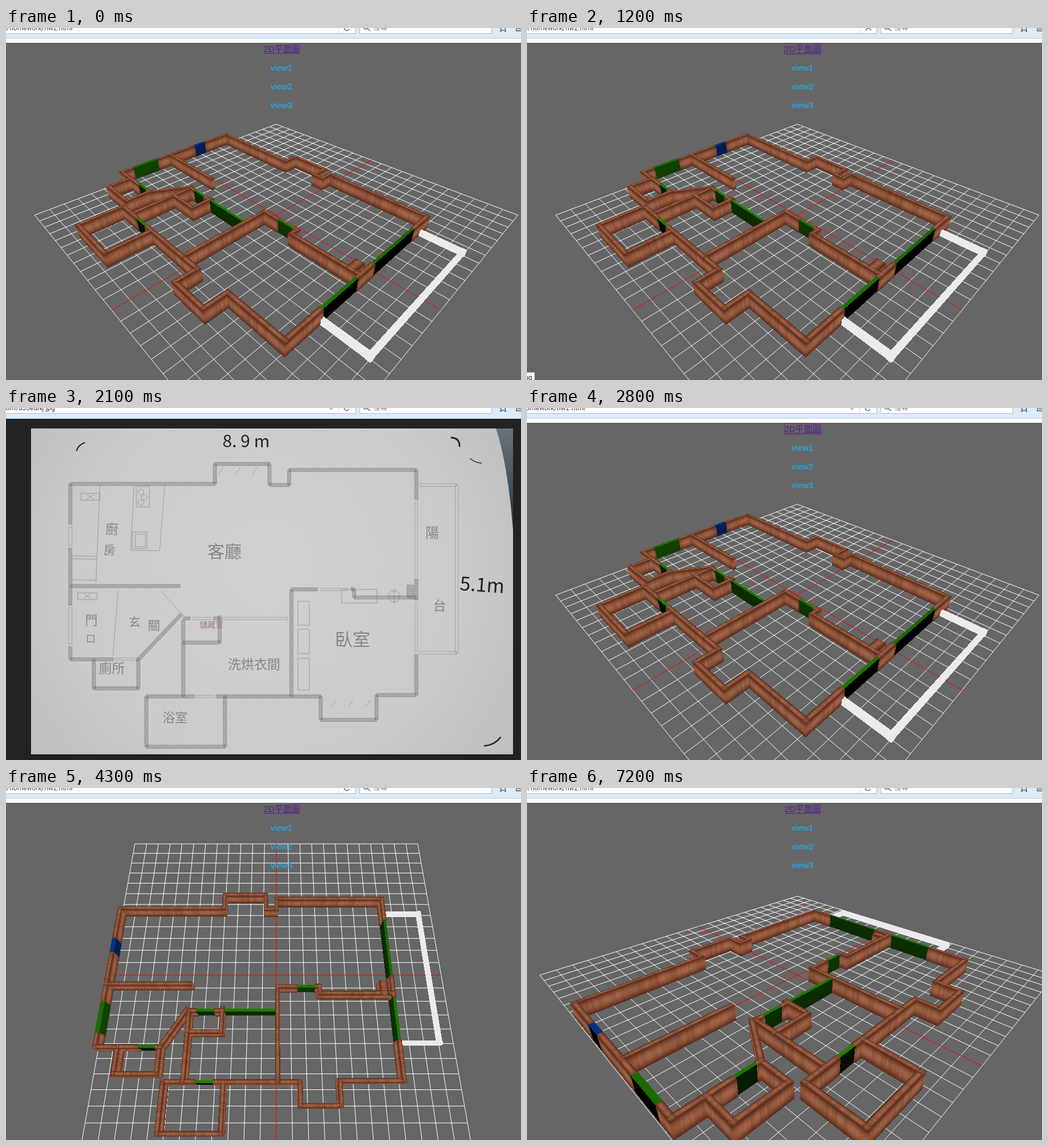
Animation of 905x619 px, one loop 8 s. Source, as an HTML page with a canvas:

```html
<!DOCTYPE html>
<html lang="zh-Hant">
<head>
<meta charset="utf-8">
<title>Floor plan</title>
<style>
html, body { margin: 0; width: 100%; height: 100%; overflow: hidden; background: #666; }
canvas { display: block; }
</style>
</head>
<body>
<canvas id="stage" width="905" height="619"></canvas>
<script>
const W = 905, H = 619, CX = 475, CY = 329, FOCAL = 650, LOOP = 8000;
const UI = 'Roboto, "Noto Sans CJK TC", "Noto Sans CJK", sans-serif';
const PAGE = '"Liberation Sans", Arial, "Noto Sans CJK TC", "Noto Sans CJK", sans-serif';
const HAND = '"Noto Sans CJK TC", "Noto Sans CJK", sans-serif';

// ---- materials ----
const hash = n => { const s = Math.sin(n * 127.1 + 3.7) * 43758.5453; return s - Math.floor(s); };
function noise(x) {
  const i = Math.floor(x), f = x - i;
  return hash(i) + (hash(i + 1) - hash(i)) * f * f * (3 - 2 * f);
}
function woodGrain(u, v) {
  const streak = 0.6 * noise(u * 14) + 0.4 * noise(u * 60 + 40);
  const bell = Math.sin(Math.PI * Math.pow(v, 1.15));
  const m = 0.08 + 0.85 * bell * (0.45 + 0.55 * streak) * (0.65 + 0.35 * Math.sin(Math.PI * u));
  return [80 + 116 * m, 36 + 90 * m, 22 + 68 * m];
}
const LIGHT = [0, 200, 100];
const lit = base => (u, v, p, n) => {
  const d = LIGHT.map((c, i) => c - p[i]);
  const k = Math.max(0, (d[0] * n[0] + d[1] * n[1] + d[2] * n[2]) / Math.hypot(...d));
  return base.map(c => c * k);
};
const wood = { thick: 3, height: 10, paint: woodGrain, solid: true };
const pillar = { ...wood, thick: 6 };
const green = { thick: 2, height: 10, paint: lit([34, 130, 0]) };
const wideGreen = { ...green, thick: 3 };
const blue = { ...wideGreen, paint: lit([8, 66, 178]) };
const rail = { thick: 2.5, height: 4, paint: () => [235, 235, 235] };

// ---- plan: one model for the 3D views and the drawing ----
const boxes = [];
function add(kind, x0, z0, x1, z1, pad = 0) {
  const len = Math.hypot(x1 - x0, z1 - z0);
  boxes.push({ kind, from: [x0, z0], to: [x1, z1], mx: (x0 + x1) / 2, mz: (z0 + z1) / 2,
    ex: (x1 - x0) / len, ez: (z1 - z0) / len,
    half: [len / 2 + pad, kind.height / 2, kind.thick / 2] });
}
// Starts at (x, z) and turns a right angle at every further coordinate.
function run(kind, axis, x, z, ...stops) {
  const pad = kind.solid || kind === rail ? 1.5 : 0;
  let alongX = axis === 'x';
  for (const s of stops) {
    const nx = alongX ? s : x, nz = alongX ? z : s;
    add(kind, x, z, nx, nz, pad);
    x = nx; z = nz;
    alongX = !alongX;
  }
}
run(wood, 'z', -118, -26.5, -50.7, -39.5, -62.6, -8, -50, 0, -59, 80.5, -41.5);
run(wood, 'z', -118, -12.5, 21.7);
run(wood, 'z', -118, 46.2, 53.9, -91.5);
run(wood, 'x', -118, 10.2, -60);
run(wood, 'x', -77.5, 53.9, -76, 71.2, -103.5, 53.9);
run(wood, 'x', -52.5, 76, -71.5, 106, -33.5, 76, 15, 90, 40, 75.2, 80.5, 51);
run(wood, 'x', -38.5, 76, -33.5);
run(wood, 'z', -58.9, 30.5, 76);
run(wood, 'z', -36.5, 28, 43.9, -58.9);
run(wood, 'x', -40.5, 29.5, -36.5);
run(wood, 'x', -58.9, 29.5, -55.5);
run(wood, 'x', 13.5, 12.2, 0.9, 76);
run(wood, 'x', 28.5, 12, 30, 17, 80.5);
run(wood, 'z', 80.5, 6, 18.5);
run(pillar, 'z', 74.5, 9.5, 17);
add(wood, -59.5, 27, -75.5, 53.5);
run(green, 'x', -90, 53.7, -79);
run(green, 'x', -54, 29.5, -42);
run(green, 'x', -35, 29.5, -0.7);
run(green, 'x', 15, 12.2, 27);
run(green, 'x', -51, 76, -40);
run(green, 'z', 80.5, -40, 4.5);
run(green, 'z', 80.5, 20, 49.5);
run(wideGreen, 'z', -118, 23.2, 44.7);
run(blue, 'z', -118, -25, -14);
run(rail, 'x', 83, -50, 109.7, 50, 83);

// ---- 3D views ----
function layer() {
  const c = document.createElement('canvas');
  c.width = W; c.height = H;
  return c;
}

function camera(x, y, z) {
  const d = Math.hypot(x, y, z), b = [x / d, y / d, z / d], h = Math.hypot(b[0], b[2]);
  const r = [b[2] / h, 0, -b[0] / h];
  const up = [b[1] * r[2], b[2] * r[0] - b[0] * r[2], -b[1] * r[0]];
  const dot = (a, p) => a[0] * p[0] + a[1] * p[1] + a[2] * p[2];
  return {
    eye: [x, y, z],
    project(p) {
      const k = FOCAL / (d - dot(b, p));
      return [CX + k * dot(r, p), CY - k * dot(up, p)];
    },
    ray(px, py) {
      const u = (px - CX) / FOCAL, v = (CY - py) / FOCAL;
      return r.map((c, i) => c * u + up[i] * v - b[i]);
    }
  };
}

function drawGrid(g, cam) {
  const line = (a, b, color) => {
    g.strokeStyle = color;
    g.beginPath();
    g.moveTo(...cam.project(a));
    g.lineTo(...cam.project(b));
    g.stroke();
  };
  for (const mid of [false, true])
    for (let i = -120; i <= 120; i += 10) {
      if ((i === 0) !== mid) continue;
      const color = mid ? '#f00' : '#fff';
      line([-120, 0, i], [120, 0, i], color);
      line([i, 0, -120], [i, 0, 120], color);
    }
}

// Casts rays at one box inside its screen bounds, keeping the nearest hit.
function castBox(box, cam, data, depth) {
  const { mx, mz, ex, ez, half } = box;
  const toWorld = (a, y, n) => [mx + a * ex - n * ez, y, mz + a * ez + n * ex];
  const xs = [], ys = [];
  for (let i = 0; i < 8; i++) {
    const s = cam.project(toWorld(i & 1 ? half[0] : -half[0], i & 2 ? 2 * half[1] : 0, i & 4 ? half[2] : -half[2]));
    xs.push(s[0]); ys.push(s[1]);
  }
  const x0 = Math.max(0, Math.floor(Math.min(...xs))), x1 = Math.min(W - 1, Math.ceil(Math.max(...xs)));
  const y0 = Math.max(0, Math.floor(Math.min(...ys))), y1 = Math.min(H - 1, Math.ceil(Math.max(...ys)));
  const ox = cam.eye[0] - mx, oz = cam.eye[2] - mz;
  const o = [ox * ex + oz * ez, cam.eye[1] - half[1], -ox * ez + oz * ex];
  for (let y = y0; y <= y1; y++) for (let x = x0; x <= x1; x++) {
    const w = cam.ray(x + 0.5, y + 0.5);
    const d = [w[0] * ex + w[2] * ez, w[1], -w[0] * ez + w[2] * ex];
    let near = -Infinity, far = Infinity, axis = 0;
    for (let i = 0; i < 3; i++) {
      const inv = 1 / (d[i] || 1e-9), mid = -o[i] * inv, ext = Math.abs(half[i] * inv);
      if (mid - ext > near) { near = mid - ext; axis = i; }
      far = Math.min(far, mid + ext);
    }
    const at = y * W + x;
    if (near > far || near >= depth[at]) continue;
    depth[at] = near;
    const q = o.map((c, i) => c + d[i] * near);
    const unit = i => Math.min(1, Math.max(0, q[i] / (2 * half[i]) + 0.5));
    const sign = d[axis] > 0 ? -1 : 1;
    const normal = axis === 1 ? [0, sign, 0] : axis === 0 ? [ex * sign, 0, ez * sign] : [-ez * sign, 0, ex * sign];
    const rgb = box.kind.paint(unit(axis === 0 ? 2 : 0), unit(axis === 1 ? 2 : 1),
      toWorld(q[0], q[1] + half[1], q[2]), normal);
    data.set([...rgb, 255], at * 4);
  }
}

function renderView(...eye) {
  const cam = camera(...eye), base = layer(), top = layer();
  const g = base.getContext('2d'), tg = top.getContext('2d');
  g.fillStyle = '#666';
  g.fillRect(0, 0, W, H);
  drawGrid(g, cam);
  const img = tg.createImageData(W, H), depth = new Float32Array(W * H).fill(1e9);
  boxes.forEach(b => castBox(b, cam, img.data, depth));
  tg.putImageData(img, 0, 0);
  g.drawImage(top, 0, 0);
  return base;
}

// ---- pencil drawing ----
// The hand drawing is out of proportion across its width.
const stretch = [[-118, 113], [-72, 244], [-58, 316], [-37, 374], [-8, 463], [1, 502], [15, 553], [40, 651], [80.5, 721], [111, 795]];
function sketchX(x) {
  let i = 1;
  while (i < stretch.length - 1 && x > stretch[i][0]) i++;
  const [a, b] = stretch[i - 1], [c, d] = stretch[i];
  return b + (x - a) * (d - b) / (c - a);
}
const sketchPoint = ([x, z]) => [sketchX(x), 283 + 2.95 * z];

function strip(g, [x0, y0], [x1, y1], kind) {
  const len = Math.hypot(x1 - x0, y1 - y0), w = kind.thick * 2;
  g.save();
  g.translate(x0, y0);
  g.rotate(Math.atan2(y1 - y0, x1 - x0));
  if (kind.solid) {
    g.fillStyle = 'rgba(110,110,112,.3)';
    g.fillRect(0, -w / 2, len, w);
  }
  g.strokeStyle = 'rgba(95,95,98,.45)';
  g.strokeRect(0, -w / 2, len, w);
  g.beginPath();
  for (let i = 2; kind.solid && i < len; i += 4) { g.moveTo(i, w / 2); g.lineTo(i + 3, -w / 2); }
  g.stroke();
  g.restore();
}

function curve(g, x0, y0, cx, cy, x1, y1, w) {
  g.lineWidth = w;
  g.beginPath();
  g.moveTo(x0, y0);
  g.quadraticCurveTo(cx, cy, x1, y1);
  g.stroke();
}

const notes = [
  ['廚', 186, 221, 23], ['房', 182, 257, 21], ['客廳', 384, 263, 30], ['門', 150, 381, 22], ['口', 149, 412, 17],
  ['玄', 226, 384, 20], ['關', 260, 390, 22], ['廁所', 186, 466, 23], ['洗烘衣間', 436, 459, 23],
  ['浴室', 297, 552, 22], ['臥室', 609, 418, 31], ['陽', 749, 228, 24], ['台', 762, 356, 23]
];

function renderSketch() {
  const c = layer(), g = c.getContext('2d');
  g.fillStyle = '#222';
  g.fillRect(0, 0, W, H);
  const paper = g.createRadialGradient(460, 270, 60, 460, 310, 520);
  paper.addColorStop(0, '#d0d0d1');
  paper.addColorStop(0.6, '#cbcbcb');
  paper.addColorStop(1, '#bfbebd');
  g.fillStyle = paper;
  g.fillRect(44, 36, 847, 573);
  const cloth = g.createLinearGradient(0, 36, 0, 215);
  cloth.addColorStop(0, '#6c7378');
  cloth.addColorStop(1, '#22354a');
  g.fillStyle = cloth;
  g.beginPath();
  g.moveTo(861, 36); g.lineTo(891, 36); g.lineTo(891, 215); g.quadraticCurveTo(882, 100, 861, 36);
  g.fill();

  g.lineWidth = 0.8;
  boxes.forEach(b => strip(g, sketchPoint(b.from), sketchPoint(b.to), b.kind));

  g.strokeStyle = 'rgba(115,115,118,.55)';
  g.lineWidth = 1;
  const ring = (x, y, r) => { g.beginPath(); g.arc(x, y, r, 0, 7); g.stroke(); };
  const line = (a, b, d, e) => { g.beginPath(); g.moveTo(a, b); g.lineTo(d, e); g.stroke(); };
  const cross = (x, y, w, h) => { line(x - w, y - h, x + w, y + h); line(x - w, y + h, x + w, y - h); };
  line(165, 135, 158, 305);
  line(225, 137, 219, 250);
  line(279, 135, 270, 250);
  line(219, 250, 270, 251);
  line(197, 320, 188, 435);
  line(272, 322, 312, 365);
  for (const y of [260, 265, 302]) line(116, y, 160, y + 1);
  g.strokeRect(229, 138, 23, 36);
  g.strokeRect(222, 218, 26, 29);
  g.strokeRect(227, 222, 18, 22);
  g.strokeRect(590, 319, 62, 24);
  for (const [y, h] of [[340, 42], [389, 43], [440, 56]]) g.strokeRect(513, y, 20, h);
  for (const [x, y] of [[143, 331], [148, 156]]) {
    g.strokeRect(x - 17, y - 6, 34, 12);
    cross(x, y, 6, 4);
  }
  for (let i = 0; i < 3; i++) {
    ring(237 + 6 * (i % 2), 148 + 9 * i, 5);
    line(373 + 30 * i, 117, 381 + 30 * i, 105);
    line(572 + 30 * i, 524, 580 + 30 * i, 514);
  }
  ring(682, 331, 10);
  line(682, 318, 682, 344);
  line(671, 331, 694, 331);

  g.textAlign = 'center';
  g.fillStyle = '#858588';
  notes.forEach(([s, x, y, size]) => { g.font = `100 ${size}px ${HAND}`; g.fillText(s, x, y); });
  g.fillStyle = '#9c7c7c';
  g.font = `100 14px ${HAND}`;
  g.fillText('儲藏室', 361, 386);
  g.fillStyle = g.strokeStyle = '#242426';
  g.font = `100 30px ${HAND}`;
  g.fillText('8. 9 m', 422, 69);
  g.save();
  g.translate(836, 323);
  g.rotate(0.07);
  g.font = `100 34px ${HAND}`;
  g.fillText('5.1m', 0, 0);
  g.restore();
  g.lineCap = 'round';
  curve(g, 124, 75, 127, 65, 138, 61, 2);
  curve(g, 783, 52, 797, 53, 797, 67, 3);
  curve(g, 816, 89, 824, 96, 835, 97, 1.5);
  curve(g, 841, 594, 858, 593, 869, 579, 2.5);
  return c;
}

// ---- browser page ----
const ctx = document.getElementById('stage').getContext('2d');
const front = renderView(150, 150, 150);
const above = renderView(0, 250, 100);
const side = renderView(-150, 120, 150);
const sketch = renderSketch();

function text(s, x, y, font, color, align) {
  ctx.font = font;
  ctx.fillStyle = color;
  ctx.textAlign = align;
  ctx.fillText(s, x, y);
}
function rect(x, y, w, h, color) {
  ctx.fillStyle = color;
  ctx.fillRect(x, y, w, h);
}
function path(color, width, ...pts) {
  ctx.strokeStyle = color;
  ctx.lineWidth = width;
  ctx.beginPath();
  pts.forEach(([x, y], i) => i ? ctx.lineTo(x, y) : ctx.moveTo(x, y));
  ctx.stroke();
}
function arc(x, y, r, from, to, color, width) {
  ctx.strokeStyle = color;
  ctx.lineWidth = width;
  ctx.beginPath();
  ctx.arc(x, y, r, from, to);
  ctx.stroke();
}

function toolbar(t, onPhoto) {
  rect(0, 0, W, 18, '#dcebf8');
  rect(0, 18, W, 1, '#c3d0dc');
  if (!onPhoto) rect(0, 19, W, 7, '#fff');
  for (const [x, w] of [[-2, 617], [621, 233]]) {
    rect(x, 0, w, 10, '#aebccb');
    rect(x + 1, 0, w - 2, 9, '#fff');
  }
  rect(584, 0, 1, 9, '#d5dbe2');
  const [url, end] = t >= 1900 && t < 2800 ? ['om/uJ3euNj.jpg', 86]
    : t >= 2800 && t < 2900 ? ['omework/hw2.html', 102] : ['o/homework/hw2.html', 117];
  text(url, end, 4, `12px ${UI}`, '#444', 'right');
  if (t >= 2000 && t < 3400) path('#999', 1.2, [569, 0], [571.5, 2.5], [574, 0]);
  if (t >= 1100 && t < 2100) path('#777', 1.6, [595, 4], [600, -1], [605, 4]);
  else arc(599, 0, 4.5, 0.4, Math.PI, '#777', 1.6);
  path('#888', 2, [635, 1], [640, 5]);
  arc(632, -2, 4, 0, 7, '#888', 2);
  text('搜尋', 646, 4, `12px ${UI}`, '#888', 'left');
  path('#555', 1.4, [868, -2], [870, 1], [869, 6], [873.5, 3.5], [878, 6], [877, 1], [879, -2]);
  path('#555', 1.4, [906, 5], [897, 5], [897, -2]);
  path('#555', 1.2, [899, 1.5], [906, 1.5]);
}

function pageText(focus) {
  const font = `15px ${PAGE}`;
  text('2D平面圖', 484.5, 42, font, '#551a8b', 'center');
  rect(453, 44, 63, 1, '#551a8b');
  for (let i = 1; i < 4; i++) text('view' + i, 484, 42 + 33 * i, font, '#1ab8ff', 'center');
  if (focus) {
    ctx.setLineDash([1, 1]);
    ctx.strokeStyle = '#551a8b';
    ctx.lineWidth = 1;
    ctx.strokeRect(452.5, 27.5, 64, 19);
    ctx.setLineDash([]);
  }
}

function draw(t) {
  const onPhoto = t >= 1300 && t < 2800;
  if (onPhoto) {
    ctx.drawImage(sketch, 0, 0);
  } else {
    ctx.drawImage(t >= 7200 ? side : t >= 4300 && t < 5800 ? above : front, 0, 0);
    pageText(t >= 1000 && t < 4200);
    if (t >= 1000 && t < 1300) {
      rect(0, 605, 14, 14, '#999');
      rect(0, 606, 13, 13, '#f4f4f4');
      text('pg', 9, 619, `12px ${UI}`, '#333', 'right');
    }
  }
  toolbar(t, onPhoto);
}

const start = performance.now();
function tick() {
  draw((performance.now() - start) % LOOP);
  requestAnimationFrame(tick);
}
tick();
</script>
</body>
</html>
```
